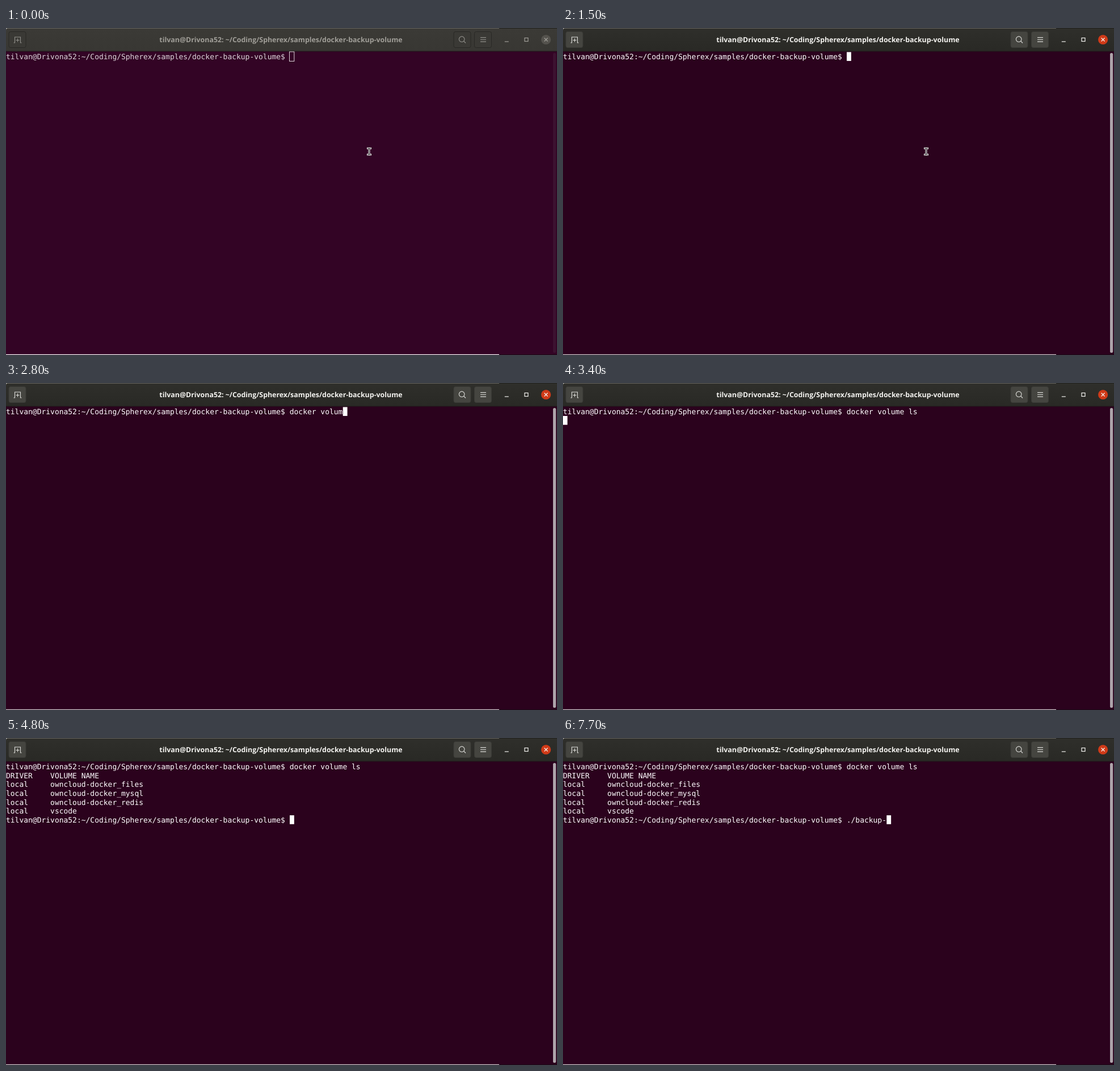
Write an HTML page that moves like this. It is 971x576 px and loops after 8 s.

```html
<!DOCTYPE html>
<html lang="en">
<head>
<meta charset="utf-8">
<title>Terminal</title>
<style>
  html, body { margin: 0; width: 100%; height: 100%; overflow: hidden; background: #2b021d; }
  svg { display: block; width: 971px; height: 576px; --ink: #f4f3f0; }
  text { white-space: pre; text-rendering: geometricPrecision; }
  .title { font: bold 12.38px "Open Sans", "Noto Sans", sans-serif; text-anchor: middle; fill: var(--ink); }
  .term { font: 12.977px "DejaVu Sans Mono", monospace; fill: var(--text); }
  .button { fill: var(--button); stroke: var(--edge); }
  .icon { fill: none; stroke: var(--icon); stroke-width: 1.1; }
  .control { fill: none; stroke: var(--ink); stroke-width: 1.2; }
</style>
</head>
<body>
<svg id="stage" viewBox="0 0 971 576">
  <defs>
    <linearGradient id="bar" x2="0" y2="1">
      <stop stop-color="var(--barTop)"/>
      <stop offset="1" stop-color="var(--barEnd)"/>
    </linearGradient>
  </defs>

  <rect width="971" height="576" fill="var(--back)"/>
  <rect width="971" height="41" fill="url(#bar)"/>
  <path d="M0 .5H869" stroke="#65645f"/>
  <path d="M869 .5H971" stroke="#20201d"/>
  <path d="M0 0H4Q0 0 0 4Z" fill="#b9b8b4"/>
  <path d="M0 41H971" stroke="#1f1b1b" stroke-width="1"/>
  <path d="M0 575.4H869" stroke="var(--floor)" stroke-width="1.2"/>
  <path d="M869 575.5H971" stroke="#1b0a15"/>

  <rect class="button" x="5" y="6.5" width="30" height="28" rx="3"/>
  <rect class="button" x="789" y="6.5" width="30" height="28" rx="3"/>
  <rect class="button" x="825.5" y="6.5" width="30" height="28" rx="3"/>
  <path class="icon" d="M13.5 26H15.5V16H25.5V26H27.5M20.5 18.5V24.5M17.5 21.5H23.5"/>
  <circle class="icon" cx="803.2" cy="19.7" r="4.8"/>
  <path class="icon" d="M806.7 23.2L810 26.5M836 16.9H846M836 20.5H846M836 24.1H846"/>

  <text class="title" x="484.5" y="25">tilvan@Drivona52: ~/Coding/Spherex/samples/docker-backup-volume</text>

  <path class="control" d="M878.8 24H885.8"/>
  <rect class="control" x="914" y="17.5" width="6" height="6"/>
  <circle cx="951.6" cy="20.5" r="8.6" fill="var(--close)"/>
  <path class="control" d="M948.6 17.5L954.6 23.5M954.6 17.5L948.6 23.5"/>

  <rect x="964" y="44" width="5.2" height="528" rx="2.6" fill="var(--scroll)"/>
  <g id="lines"></g>
  <rect id="caret"/>
  <g id="pointer" fill="none" stroke-linecap="square">
    <path d="M637.5 212H639L640 213L641 212H642.5M640 213V222M637.5 223H639L640 222L641 223H642.5" stroke="#f5f5f5" stroke-width="3"/>
    <path d="M637.5 212H639L640 213L641 212H642.5M640 213V222M637.5 223H639L640 222L641 223H642.5" stroke="#111" stroke-width="1"/>
  </g>
</svg>
<script>
  const LOOP = 8000, CELL = 7.8125, ROW = 15.625, ROWS = 7;
  const PROMPT = "tilvan@Drivona52:~/Coding/Spherex/samples/docker-backup-volume$ ";
  const LIST = "docker volume ls", RUN = "./backup-";
  const OUTPUT = [
    "DRIVER    VOLUME NAME",
    "local     owncloud-docker_files",
    "local     owncloud-docker_mysql",
    "local     owncloud-docker_redis",
    "local     vscode"
  ];

  // [time, characters on the line]
  const listKeys = [[0, 0], [1600, 1], [1700, 2], [1800, 4], [1900, 5], [2100, 7],
    [2300, 8], [2400, 9], [2500, 10], [2700, 11], [2800, 12], [3000, 13], [3100, 15], [3200, 16]];
  const wordKeys = [[3500, 0], [3700, 1], [3800, 2], [3900, 3], [4000, 4], [4400, 3], [4800, 0]];
  const runKeys = [[4900, 2], [6800, 3], [6900, 4], [7100, 5], [7300, 7], [7700, 9]];
  const blinks = [[600, 1500], [5500, 6100], [6700, 6800]];

  const unfocused = {
    barTop: "#3b3a36", barEnd: "#383733", back: "#330425", button: "#3a3935", edge: "#292825",
    icon: "#92918c", ink: "#a09e98", text: "#dcd5da", close: "#54524d", scroll: "#3c1230", floor: "#f2f0f1"
  };
  const focused = {
    barTop: "#2f2f2b", barEnd: "#292925", back: "#2b021d", button: "#454540", edge: "#3a3a36",
    icon: "#dededa", ink: "#f4f3f0", text: "#ffffff", close: "#d03a18", scroll: "#aea4aa", floor: "#c9c3c6"
  };
  const focusing = { ...focused, barTop: "#30302c", barEnd: "#2b2a27", button: "#3e3e3a", icon: "#c4c3be" };

  const byId = id => document.getElementById(id);
  const stage = byId("stage"), caret = byId("caret"), pointer = byId("pointer");
  const rows = Array.from({ length: ROWS }, (_, i) => {
    const row = document.createElementNS("http://www.w3.org/2000/svg", "text");
    row.setAttribute("class", "term");
    row.setAttribute("y", 55 + i * ROW);
    byId("lines").append(row);
    return row;
  });

  const set = (el, attrs) => {
    for (const key in attrs) el.setAttribute(key, attrs[key]);
  };
  const typed = (text, keys, t) => text.slice(0, keys.findLast(key => key[0] <= t)[1]);

  function screen(t) {
    const lines = [PROMPT + typed(LIST, listKeys, t)];
    if (t >= 3500) {
      const entry = t < 4900 ? typed("dock", wordKeys, t) : typed(RUN, runKeys, t);
      lines.push(...OUTPUT, PROMPT + entry);
    } else if (t >= 3400) {
      lines.push("");
    }
    return lines;
  }

  function draw(t) {
    const theme = t < 100 ? unfocused : t < 200 ? focusing : focused;
    for (const key in theme) stage.style.setProperty("--" + key, theme[key]);

    const lines = screen(t);
    rows.forEach((row, i) => { row.textContent = lines[i] || ""; });

    const hollow = t < 100;
    const inset = hollow ? 0.5 : 0;
    const last = lines.length - 1;
    set(caret, {
      x: lines[last].length * CELL - inset,
      y: 42.4 + last * ROW - inset,
      width: CELL + inset,
      height: ROW + inset * 2,
      fill: hollow ? "none" : "#fff",
      stroke: hollow ? "#dcd5da" : "none",
      visibility: blinks.some(([off, on]) => t >= off && t < on) ? "hidden" : "visible"
    });
    pointer.setAttribute("visibility", t < 1600 ? "visible" : "hidden");
  }

  const start = performance.now();
  function tick() {
    draw((performance.now() - start) % LOOP);
    requestAnimationFrame(tick);
  }
  tick();
</script>
</body>
</html>
```
